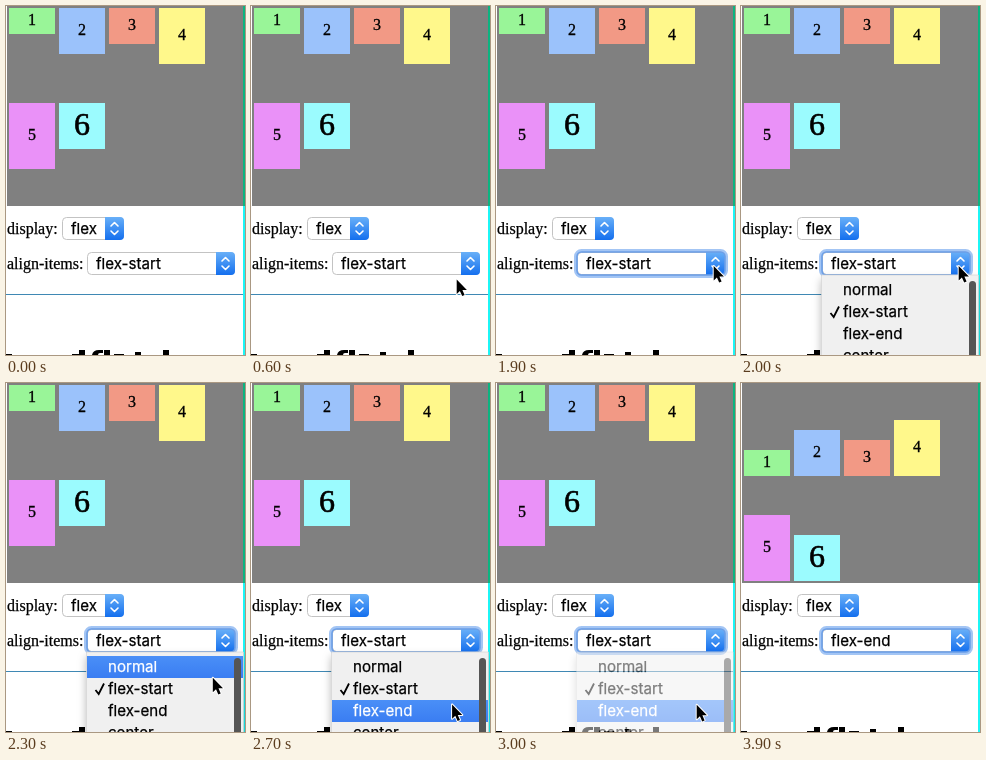
These frames come from a looping animation (239 by 349 pixels, 4.6 s). An HTML page:

```html
<!DOCTYPE html>
<html lang="en">
<head>
<meta charset="utf-8">
<title>align-items</title>
<style>
html, body { margin: 0; width: 100%; height: 100%; overflow: hidden; background: #fff; }
svg { display: block; width: 239px; height: 349px; }
.serif { font: 16px "Liberation Serif", Times, serif; }
.ui { font: 15.1px Inter, Roboto, sans-serif; }
text { stroke: currentColor; stroke-width: .25; }
</style>
</head>
<body>
<svg viewBox="0 0 239 349" xmlns="http://www.w3.org/2000/svg">
  <defs>
    <linearGradient id="blue" x2="0" y2="1">
      <stop offset="0" stop-color="#69b0f8"/>
      <stop offset="1" stop-color="#146fee"/>
    </linearGradient>
    <linearGradient id="row" x2="0" y2="1">
      <stop offset="0" stop-color="#4a8ff7"/>
      <stop offset="1" stop-color="#3a7df2"/>
    </linearGradient>
    <filter id="shadow" x="-20%" y="-20%" width="140%" height="140%">
      <feDropShadow dx="0" dy="5" stdDeviation="4" flood-opacity=".28"/>
    </filter>
  </defs>

  <rect width="239" height="349" fill="#fff"/>
  <rect x="1" width="237" height="200" fill="#808080"/>
  <g id="items" class="serif" text-anchor="middle"></g>

  <text class="serif" x="1" y="228">display:</text>
  <text class="serif" x="1" y="263">align-items:</text>
  <rect y="288" width="238" height="1" fill="#3f88b4"/>

  <!-- tops of a heading cut off by the lower edge -->
  <path d="M0 348h6v1h-6z M66 348h7v1h-7z M73 344h6v5h-6z M86 349q1-5 7-5h4v3h-3q-2 0-2 2z M98 344h6v5h-6z M108 348h10v1h-10z M129 346h6v3h-6z M157 344h6v5h-6z"/>

  <rect x="237" width="2" height="200" fill="#0cb480"/>
  <rect x="237" y="200" width="2" height="149" fill="#1cf6f6"/>

  <g id="selects" class="ui"></g>
  <g id="ring" fill="none">
    <rect x="79.5" y="244.5" width="151" height="26" rx="6" stroke="#a3c5f4" stroke-width="3"/>
    <rect x="81" y="246" width="148" height="23" rx="4.5" stroke="#6b9fe8" stroke-width="1.6"/>
  </g>

  <g id="menu" class="ui">
    <path d="M80.5 269H237.5V360H80.5Z" fill="#f0f0f0" stroke="#cfcfcf" stroke-width=".6" filter="url(#shadow)"/>
    <rect id="hover" x="81" width="156" height="22" fill="url(#row)"/>
    <g id="options"></g>
    <path id="check" d="M89.5 307l3.2 4 5.3-10.5" fill="none" stroke="#000" stroke-width="1.8"/>
    <rect x="228" y="275" width="7" height="90" rx="3.5" fill="#555"/>
  </g>

  <path id="cursor" d="M0 0V14.4L3.2 11.4L5.5 16.6L7.9 15.6L5.7 10.5H10.2Z" fill="#000" stroke="#fff" stroke-width="2" paint-order="stroke" stroke-linejoin="round"/>
</svg>

<script>
const LOOP = 4600, STEP = 100;
const SHOW = 400, FOCUS = 1100, OPEN = 2000, FADE = 3000, PICK = 3100, HIDE = 3600;
const ROW_TOP = 273, ROW_H = 22;

const $ = id => document.getElementById(id);

function add(parent, tag, attrs, text = "") {
  const el = document.createElementNS("http://www.w3.org/2000/svg", tag);
  for (const key in attrs) el.setAttribute(key, attrs[key]);
  el.textContent = text;
  parent.append(el);
  return el;
}

// column, line, height, colour
const items = [
  [0, 0, 26, "#99f598"], [1, 0, 46, "#9bc2fb"], [2, 0, 36, "#f29985"],
  [3, 0, 56, "#fff88b"], [0, 1, 66, "#ea91f8"], [1, 1, 46, "#9bfbfe"]
].map(([col, line, h, fill], i) => {
  const g = add($("items"), "g", {});
  const size = i === 5 ? 32 : 16;
  add(g, "rect", { width: 46, height: h, fill });
  add(g, "text", { x: 23, y: h / 2 + size * .27, style: `font-size:${size}px;stroke-width:${size / 50}` }, i + 1);
  return { g, x: 3 + 50 * col, start: line ? 97 : 2, end: (line ? 198 : 93) - h };
});

function select(x, y, w, label) {
  const g = add($("selects"), "g", { transform: `translate(${x} ${y})` });
  add(g, "rect", { x: .5, y: .5, width: w - 1, height: 22, rx: 4, fill: "#fff", stroke: "#c3c3c3" });
  add(g, "path", { d: `M${w - 19} 0h15q4 0 4 4v15q0 4-4 4h-15z`, fill: "url(#blue)" });
  add(g, "path", {
    d: `M${w - 13} 9l3.5-3.5 3.5 3.5m-7 5l3.5 3.5 3.5-3.5`,
    fill: "none", stroke: "#fff", "stroke-width": 1.6, "stroke-linecap": "round", "stroke-linejoin": "round"
  });
  return add(g, "text", { x: 9, y: 16.5 }, label);
}
select(56, 211, 62, "flex");
const value = select(81, 246, 148, "flex-start");

const options = ["normal", "flex-start", "flex-end", "center"].map((name, i) =>
  add($("options"), "text", { x: 102, y: ROW_TOP + ROW_H * i + 16 }, name));

// time, x, y of the pointer tip
const path = [
  [400, 196, 301.5], [500, 202, 286], [600, 205.7, 273.5], [700, 211, 266],
  [900, 218.7, 260], [1300, 218.7, 260], [1500, 220, 262], [1600, 219.5, 262],
  [1700, 217.7, 260], [2100, 217.7, 260], [2200, 213, 277], [2300, 206.8, 294.8],
  [2400, 203.5, 309], [2500, 201.5, 321], [2600, 201.5, 321], [2800, 200.7, 321.8], [3600, 200.7, 321.8]
];

function pointer(t) {
  const i = Math.max(1, path.findIndex(p => p[0] >= t));
  const [t0, x0, y0] = path[i - 1], [t1, x1, y1] = path[i];
  const k = (t - t0) / (t1 - t0);
  return [x0 + (x1 - x0) * k, y0 + (y1 - y0) * k];
}

const show = (el, on) => el.setAttribute("visibility", on ? "visible" : "hidden");

function draw(ms) {
  const t = Math.floor(ms % LOOP / STEP) * STEP;
  const picked = t >= PICK, open = t >= OPEN && t < PICK, shown = t >= SHOW && t < HIDE;

  for (const it of items)
    it.g.setAttribute("transform", `translate(${it.x} ${picked ? it.end : it.start})`);
  value.textContent = picked ? "flex-end" : "flex-start";
  show($("ring"), t >= FOCUS);
  show($("cursor"), shown);
  show($("menu"), open);
  show($("hover"), false);
  if (!shown) return;

  const [x, y] = pointer(t);
  $("cursor").setAttribute("transform", `translate(${x} ${y})`);
  if (!open) return;

  const row = Math.floor((y - ROW_TOP) / ROW_H);
  $("menu").setAttribute("opacity", t >= FADE ? .5 : 1);
  $("hover").setAttribute("y", ROW_TOP + ROW_H * row);
  show($("hover"), row >= 0);
  options.forEach((el, i) => {
    el.style.color = el.style.fill = i === row ? "#fff" : "#000";
  });
  $("check").setAttribute("stroke", row === 1 ? "#fff" : "#000");
}

const begin = performance.now();
function tick() {
  draw(performance.now() - begin);
  requestAnimationFrame(tick);
}
tick();
</script>
</body>
</html>
```
